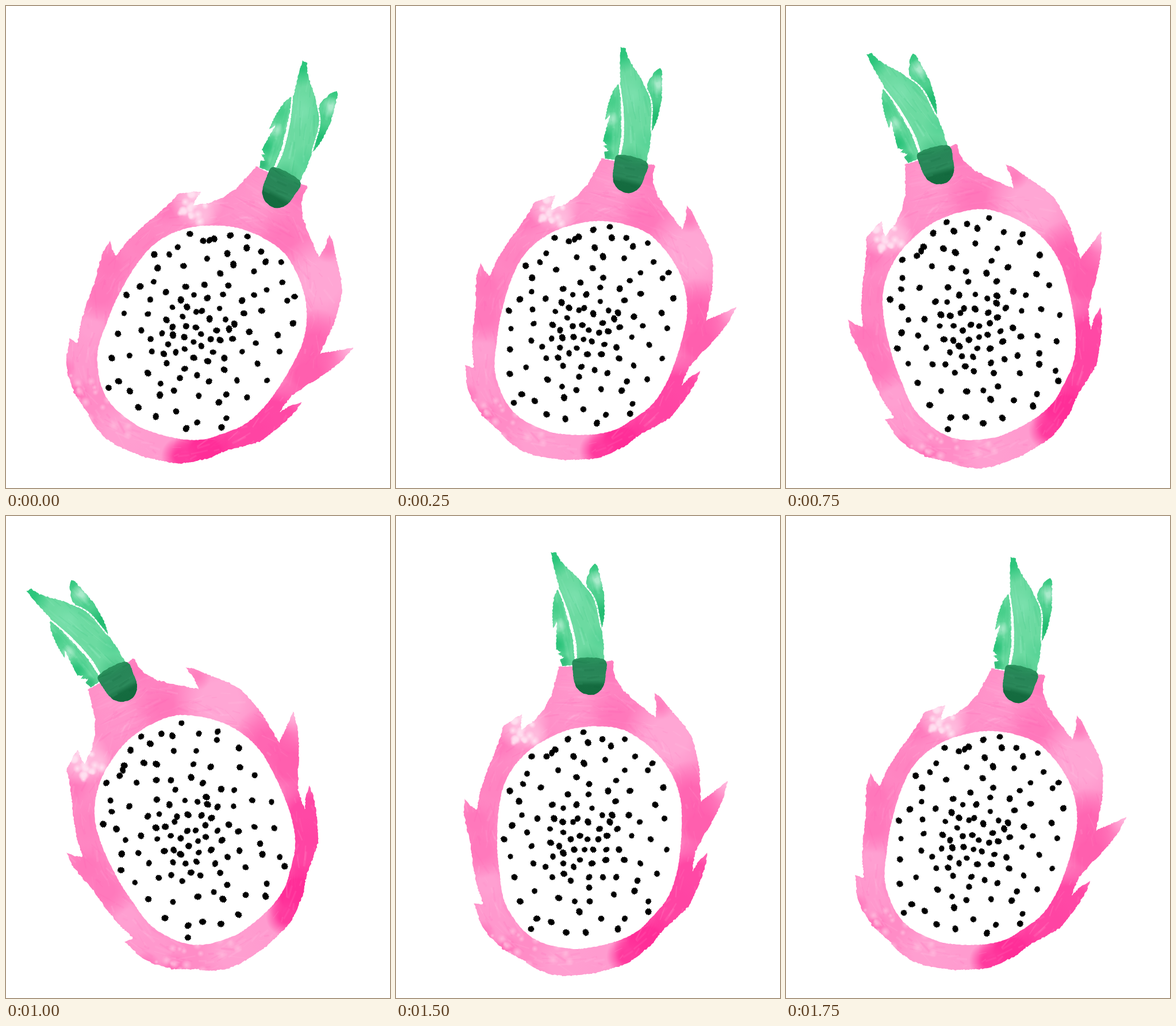
An HTML page with a canvas that plays this animation: 668x838 px, repeating every 2000 ms.

```html
<!DOCTYPE html>
<html lang="en">
<head>
<meta charset="utf-8">
<title>Swinging dragon fruit</title>
<style>
html, body { margin: 0; width: 100%; height: 100%; overflow: hidden; background: #fff; }
canvas { display: block; }
</style>
</head>
<body>
<canvas id="stage" width="668" height="838"></canvas>
<script>
const ctx = document.getElementById('stage').getContext('2d');
const STEP = 250;
const PIVOT = [331.5, 404.9];

// Each pose: pivot x, pivot y, turn in degrees, scale
const POSES = [
  [411.4, 429.2, 27.65, 1.009],
  [370.4, 412.8, 13.7, 0.985],
  [331.5, 404.9, 0, 1],
  [292.5, 402.8, -15.25, 1.017],
  [253.8, 406.8, -28, 1.0135]
];
const ORDER = [0, 1, 2, 3, 4, 3, 2, 1];

const RIGHT_SKIN = [
  [283, 262], [330, 260], [364, 252], [378, 251], [378, 270], [383, 285], [395, 303], [420, 325],
  [451, 350], [453, 330], [449, 306], [461, 316], [478, 337], [500, 362], [515, 383],
  [522, 410], [528, 440], [530, 497], [550, 481], [577, 460], [570, 490], [553, 526],
  [535, 556], [520, 585], [515, 619], [527, 600], [541, 586], [540, 602], [528, 638],
  [510, 678], [490, 697], [462, 722], [448, 742], [420, 766], [400, 779]
];
const LEFT_SKIN = [
  [370, 788], [345, 795], [292, 800], [268, 797], [247, 789], [225, 775], [185, 752], [160, 728],
  [146, 705], [136, 673], [152, 675], [140, 640], [133, 600], [130, 570], [122, 540],
  [118, 515], [119, 491], [129, 503], [141, 511], [146, 480], [157, 447], [172, 412],
  [182, 383], [186, 367], [205, 352], [219, 345], [217, 373], [240, 356], [258, 335],
  [270, 312], [276, 290]
];
const FLESH = [
  [335, 366], [375, 367], [405, 376], [440, 400], [468, 430], [487, 465], [496, 500],
  [497, 540], [494, 585], [486, 630], [470, 668], [440, 703], [415, 725], [375, 742],
  [325, 752], [295, 751], [260, 744], [230, 728], [205, 700], [187, 665], [180, 620],
  [176, 575], [177, 530], [181, 495], [190, 462], [208, 432], [235, 405], [270, 384], [300, 372]
];
const MAIN_LEAF = [
  [270, 63], [278, 64], [288, 80], [310, 101], [331, 124], [341, 136], [348, 155], [356, 185],
  [361, 220], [362, 256], [314, 256], [313, 225], [306, 190], [297, 160], [285, 130],
  [277, 100], [272, 80]
];
const LEFT_LEAF = [
  [281, 127], [287, 140], [295, 165], [303, 195], [309, 222], [311, 252], [308, 259],
  [290, 261], [285, 249], [292, 246], [281, 240], [288, 237], [279, 232], [279, 212],
  [280, 185], [273, 196], [272, 165], [275, 140]
];
const RIGHT_LEAF = [
  [346, 82], [351, 88], [356, 110], [362, 135], [363, 165], [360, 190], [357, 196],
  [354, 175], [345, 145], [332, 125], [331, 112], [338, 92]
];
const CAP = [
  [307, 254], [316, 248], [338, 246], [365, 252], [364, 280], [360, 297], [350, 308],
  [338, 311], [323, 307], [312, 294], [308, 275]
];

// Seed x positions in rows 6 px apart
const SEEDS = [
  [326], [], [299, 359, 398], [334], [374], [277], [271], [309, 236, 262, 416], [364],
  [327, 446], [], [398, 282, 438], [228], [314], [383], [221, 336], [252, 465],
  [198, 369, 407], [299, 335], [], [214, 382], [272, 314, 451], [291, 341], [],
  [219, 359, 405, 376], [246, 275, 316, 467], [290, 308, 334, 372, 424], [202],
  [268, 354, 385], [291, 228], [320, 367, 410], [443, 188, 304, 333, 352], [269],
  [236, 284], [310, 328, 343, 366, 388, 471], [291], [199, 273], [397, 320, 365],
  [425, 291, 239, 341], [260, 309], [], [292, 454], [272, 336, 360, 383, 206], [304, 420],
  [], [336], [241, 415], [379], [283], [216, 337, 311, 439], [], [], [319, 439], [],
  [357, 398, 245], [270], [], [235, 386], [296, 330]
];

let seed = 1;
function rnd() {
  seed = (seed * 16807) % 2147483647;
  return seed / 2147483647;
}
const spread = a => (rnd() - 0.5) * 2 * a;

function smooth(pts) {
  const out = [], n = pts.length;
  for (let i = 0; i < n; i++) {
    const [a, b, c, d] = [-1, 0, 1, 2].map(k => pts[(i + k + n) % n]);
    for (let t = 0; t < 1; t += 0.25) {
      out.push([0, 1].map(k => b[k] + 0.5 * t * (c[k] - a[k] +
        t * (2 * a[k] - 5 * b[k] + 4 * c[k] - d[k] + t * (3 * (b[k] - c[k]) + d[k] - a[k])))));
    }
  }
  return out;
}

// Closed outline with a slightly torn edge
function rough(pts, jag) {
  const path = new Path2D();
  pts.forEach((p, i) => {
    const q = pts[(i + 1) % pts.length];
    const n = Math.max(1, Math.round(Math.hypot(q[0] - p[0], q[1] - p[1]) / 2.5));
    for (let k = 0; k < n; k++) {
      path.lineTo(p[0] + (q[0] - p[0]) * k / n + spread(jag),
                  p[1] + (q[1] - p[1]) * k / n + spread(jag));
    }
  });
  path.closePath();
  return path;
}

function blob(x, y, r, color, flat = 0.2) {
  const g = ctx.createRadialGradient(x, y, 0, x, y, r);
  g.addColorStop(0, color);
  g.addColorStop(flat, color);
  g.addColorStop(1, color + '00');
  ctx.fillStyle = g;
  ctx.fillRect(x - r, y - r, 2 * r, 2 * r);
}

function streak(x, y, angle, len, color, alpha) {
  ctx.globalAlpha = alpha;
  ctx.strokeStyle = color;
  ctx.lineWidth = 1 + rnd() * 3;
  ctx.beginPath();
  ctx.moveTo(x, y);
  ctx.lineTo(x + Math.cos(angle) * len, y + Math.sin(angle) * len);
  ctx.stroke();
  ctx.globalAlpha = 1;
}

function painted(path, base, paint) {
  ctx.save();
  ctx.clip(path);
  ctx.fillStyle = base;
  ctx.fill(path);
  paint();
  ctx.restore();
}

function skin() {
  painted(rough([...RIGHT_SKIN, ...LEFT_SKIN], 1), '#ff8cc6', () => {
    blob(320, 300, 70, '#ff97cb');
    blob(375, 275, 35, '#ff7abd');
    blob(385, 350, 70, '#ff78bb');
    blob(300, 345, 55, '#ff93ca');
    blob(475, 385, 80, '#ffa6d4', 0.4);
    blob(459, 330, 24, '#ff80bf');
    blob(515, 490, 65, '#ff66b2', 0.3);
    blob(530, 540, 55, '#ff5fae', 0.4);
    blob(515, 640, 75, '#ff48a5', 0.5);
    blob(485, 690, 65, '#ff44a3', 0.5);
    blob(577, 460, 38, '#ffb9de', 0.1);
    blob(345, 765, 75, '#ff9bcf', 0.5);
    blob(290, 775, 60, '#ff9ed0', 0.4);
    blob(436, 744, 58, '#ff2e98', 0.5);
    blob(400, 765, 34, '#ff3a9e', 0.3);
    blob(170, 700, 65, '#ff98cd', 0.4);
    blob(150, 727, 24, '#ff6cb6', 0.1);
    blob(190, 752, 26, '#ff70b8', 0.1);
    blob(160, 640, 48, '#ff9fd1', 0.3);
    blob(148, 580, 50, '#ff79bc', 0.3);
    blob(140, 530, 45, '#ff78bb', 0.3);
    blob(172, 470, 55, '#ff84c1', 0.3);
    blob(182, 400, 30, '#ff7bbd', 0.2);
    blob(220, 360, 48, '#ffc0e0', 0.25);
    blob(240, 382, 26, '#ffbadd', 0.2);

    for (let i = 0; i < 420; i++) {
      const a = rnd() * Math.PI * 2, k = 0.92 + rnd() * 0.42;
      const x = 336 + 162 * k * Math.cos(a), y = 560 + 195 * k * Math.sin(a);
      const light = rnd() < 0.5;
      streak(x, y, Math.atan2(195 * Math.cos(a), -162 * Math.sin(a)) + spread(0.5),
        8 + rnd() * 24, light ? '#ffd3ea' : '#ff4fa8', 0.04 + rnd() * 0.09);
    }
    for (let i = 0; i < 50; i++) {
      streak(265 + rnd() * 120, 270 + rnd() * 90, spread(0.15), 15 + rnd() * 30,
        rnd() < 0.5 ? '#ffc4e2' : '#ff5fb0', 0.05 + rnd() * 0.08);
    }
    for (let i = 0; i < 24; i++) {
      blob(195 + rnd() * 50, 350 + rnd() * 45, 3 + rnd() * 7, '#ffe0f0', 0);
      blob(160 + rnd() * 170, 715 + rnd() * 70, 3 + rnd() * 7, '#ffb5da', 0);
    }
  });
}

function leafStreaks(n, x, y, w, h, angle) {
  for (let i = 0; i < n; i++) {
    streak(x + rnd() * w, y + rnd() * h, angle + spread(0.12), 12 + rnd() * 28,
      rnd() < 0.5 ? '#a5edc9' : '#30c07c', 0.06 + rnd() * 0.12);
  }
}

function leaves() {
  painted(rough(RIGHT_LEAF, 0.9), '#4fd08f', () => {
    blob(361, 170, 30, '#23bd72');
    blob(345, 84, 17, '#35c981');
    blob(350, 112, 19, '#a9eaca');
    blob(336, 122, 14, '#5fd79b');
    leafStreaks(25, 330, 85, 34, 90, 1.35);
  });
  painted(rough(LEFT_LEAF, 0.9), '#62d79b', () => {
    blob(276, 160, 25, '#48cf8b');
    blob(281, 224, 24, '#2cc47b');
    blob(291, 254, 15, '#34bd7a');
    blob(284, 190, 13, '#a0e8c4');
    leafStreaks(30, 272, 130, 35, 110, 1.35);
  });
  painted(rough(MAIN_LEAF, 0.9), '#6cdaa1', () => {
    blob(273, 72, 36, '#2cc67c');
    blob(330, 130, 28, '#58d596');
    blob(310, 140, 32, '#78dfab');
    blob(358, 215, 30, '#59d497');
    blob(338, 255, 30, '#4dc78a');
    leafStreaks(70, 270, 75, 85, 170, 1.2);
  });
  // Pale seams between the leaves
  ctx.strokeStyle = '#fff';
  ctx.lineWidth = 2.4;
  ctx.setLineDash([6, 0.8]);
  for (const seam of ['M281 124Q294 151 302 178T313 225L314 254',
                      'M332 125Q347 140 351 163T357 195']) ctx.stroke(new Path2D(seam));
  ctx.setLineDash([]);
}

function cap() {
  painted(rough(smooth(CAP), 0.5), '#278558', () => {
    const g = ctx.createLinearGradient(0, 246, 0, 311);
    g.addColorStop(0, '#29925c');
    g.addColorStop(0.25, '#278557');
    g.addColorStop(0.6, '#2a8759');
    g.addColorStop(0.74, '#156c40');
    g.addColorStop(1, '#136a3e');
    ctx.fillStyle = g;
    ctx.fillRect(300, 240, 70, 75);
    for (let i = 0; i < 22; i++) {
      streak(305 + rnd() * 50, 250 + rnd() * 48, spread(0.2), 10 + rnd() * 18,
        rnd() < 0.5 ? '#3a9c6c' : '#0d5c35', 0.08 + rnd() * 0.12);
    }
  });
}

function pip(x, y) {
  const r = 4.5 + rnd() * 1.1, long = 1 + rnd() * 0.22, tilt = rnd() * 3;
  ctx.beginPath();
  for (let i = 0; i < 22; i++) {
    const a = i / 22 * Math.PI * 2, d = r + (i % 2 ? -0.5 : 0.6) + spread(0.3);
    const u = Math.cos(a) * d * long, v = Math.sin(a) * d;
    ctx.lineTo(x + u * Math.cos(tilt) - v * Math.sin(tilt),
               y + u * Math.sin(tilt) + v * Math.cos(tilt));
  }
  ctx.fill();
}

function draw([x, y, deg, size]) {
  seed = 4217;
  ctx.setTransform(1, 0, 0, 1, 0, 0);
  ctx.fillStyle = '#fff';
  ctx.fillRect(0, 0, 668, 838);
  ctx.translate(x, y);
  ctx.rotate(deg * Math.PI / 180);
  ctx.scale(size, size);
  ctx.translate(-PIVOT[0], -PIVOT[1]);

  skin();
  ctx.fillStyle = '#fff';
  ctx.fill(rough(smooth(FLESH), 0.5));
  leaves();
  cap();
  ctx.fillStyle = '#000';
  SEEDS.forEach((row, i) => row.forEach(sx => pip(sx, 376 + i * 6)));
}

let shown = -1;
function tick() {
  const pose = ORDER[Math.floor(performance.now() / STEP) % ORDER.length];
  if (pose !== shown) draw(POSES[shown = pose]);
  requestAnimationFrame(tick);
}
tick();
</script>
</body>
</html>
```
